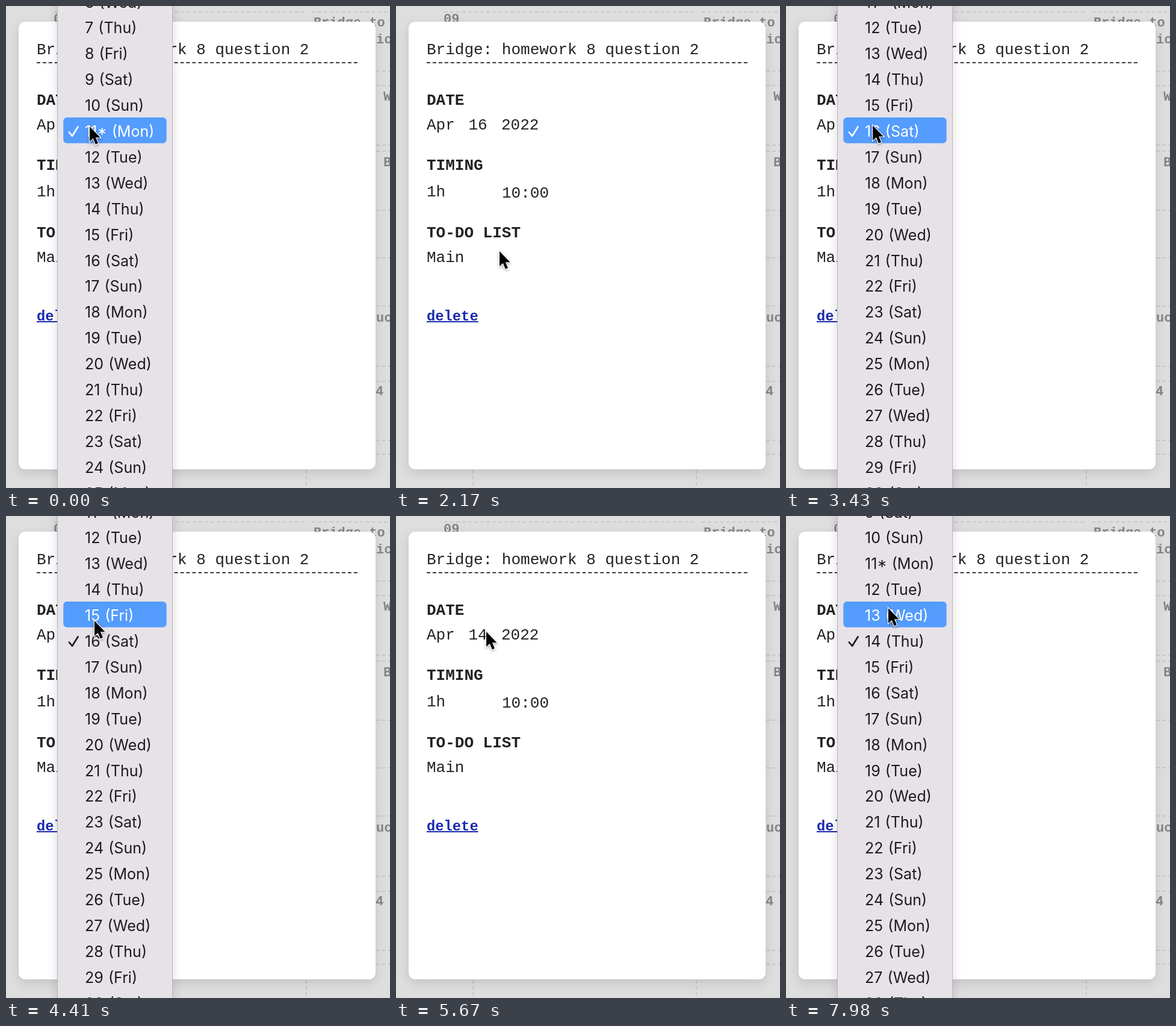
Recreate the animation shown at these times as an HTML page. Size 638x800 px, loop 8000 ms.

```html
<!DOCTYPE html>
<html lang="en">
<head>
<meta charset="utf-8">
<title>Task date picker</title>
<style>
  html, body { margin: 0; width: 100%; height: 100%; overflow: hidden; background: #dedede; }
  svg { display: block; }
  text { white-space: pre; }
  .mono { font: 26px "Courier New", "Liberation Mono", monospace; fill: #222; }
  .bold { font-weight: 700; }
  .back { font: 700 22px "Courier New", "Liberation Mono", monospace; fill: #858585; }
  .grid { stroke: #c9c9c9; stroke-width: 2; stroke-dasharray: 6 4; fill: none; }
  .item { font: 25.1px Inter, Roboto, sans-serif; word-spacing: 1px; }
  .link { font-size: 23.8px; fill: #1a2aad; }
  #card { filter: drop-shadow(0 6px 9px rgba(0, 0, 0, .12)); }
  #panel { filter: drop-shadow(0 3px 9px rgba(0, 0, 0, .16)); }
  #cursor { filter: drop-shadow(0 2px 2px rgba(0, 0, 0, .3)); }
</style>
</head>
<body>
<svg width="638" height="800" viewBox="0 0 638 800">
  <rect width="638" height="800" fill="#dedede"/>
  <g id="backdrop"></g>
  <rect id="card" x="21" y="26" width="593" height="743" rx="11" fill="#fff"/>
  <g id="form">
    <path d="M51 94.2H584" stroke="#222" stroke-width="1.8" stroke-dasharray="6 3.94"/>
    <path d="M51 524H136.5" stroke="#1a2aad" stroke-width="2"/>
  </g>
  <g id="menu">
    <rect id="panel" x="86" y="-20" width="190" height="840" fill="#e6e2e8"/>
    <path d="M85.5 0V800M276.5 0V800" stroke="#b9b6bb"/>
    <rect id="highlight" x="95.3" width="171.4" height="42.7" rx="6" fill="#549cfd"/>
    <path id="check" d="M104.8 209.5L110 215.7L119.5 200.5" fill="none" stroke-width="2.7" stroke-linecap="round" stroke-linejoin="round"/>
    <g id="items"></g>
  </g>
  <path id="cursor" d="M0 0V25L5.7 19.8L9.8 29.6L14 27.8L9.9 18.2H17.6Z" fill="#000" stroke="#fff" stroke-width="2.2" paint-order="stroke"/>
</svg>
<script>
const LOOP = 8000, STEP = 70, ROW = 42.9, CHECK_TOP = 185;
const FADE = 140, BLINK = 140;
const WEEK = ["Mon", "Tue", "Wed", "Thu", "Fri", "Sat", "Sun"];
const INK = "#1d1b1e";

const $ = id => document.getElementById(id);

function add(parent, tag, attrs, content = "") {
  const node = document.createElementNS("http://www.w3.org/2000/svg", tag);
  for (const key in attrs) node.setAttribute(key, attrs[key]);
  node.textContent = content;
  return parent.appendChild(node);
}

const label = (parent, cls, x, y, content) =>
  add(parent, "text", { class: cls, x, y }, content);

// Dimmed calendar behind the card
const backdrop = $("backdrop");
add(backdrop, "path", { class: "grid", d: "M128 770V800M499 770V800M80 10H500M508 10H638" });
for (const y of [108, 132, 231, 241, 339, 418, 498, 598, 623, 721, 744])
  add(backdrop, "path", { class: "grid", d: `M505 ${y}H638` });
label(backdrop, "back", 79, 28, "09");
label(backdrop, "back", 511, 34, "Bridge to");
label(backdrop, "back", 615, 62, "ic");
label(backdrop, "back", 627, 157, "W");
label(backdrop, "back", 627, 266, "B");
label(backdrop, "back", 615, 524, "uc");
label(backdrop, "back", 614, 646, "4");

// Task form
const form = $("form");
label(form, "mono", 51, 80, "Bridge: homework 8 question 2");
label(form, "mono bold", 51, 164, "DATE");
label(form, "mono", 51, 205, "Apr");
const dayText = label(form, "mono", 120.5, 205, "");
label(form, "mono", 175, 205, "2022");
label(form, "mono bold", 51, 272, "TIMING");
label(form, "mono", 51, 316, "1h");
label(form, "mono", 176, 318, "10:00");
label(form, "mono bold", 51, 384, "TO-DO LIST");
label(form, "mono", 51, 425, "Main");
label(form, "mono bold link", 51, 522, "delete");

// Day menu
const items = Array.from({ length: 30 }, (_, i) => {
  const day = i + 1, star = day === 11 ? "*" : "";
  return label($("items"), "item", 131, 0, `${day}${star} (${WEEK[(day + 3) % 7]})`);
});

const sessions = [
  { open: 0, close: 2030, checked: 11, picked: 16 },
  { open: 3290, close: 5180, checked: 16, picked: 14 },
  { open: 7350, close: Infinity, checked: 14 }
];

// Pointer stops: time, x, y
const stops = [
  [0, 139, 200], [250, 139, 200], [1120, 158, 417], [1700, 172, 407],
  [2800, 172, 407], [3220, 145, 197], [3700, 143, 200], [4410, 147, 174],
  [4760, 150, 130], [5250, 150, 130], [5600, 150, 192], [6110, 150, 192],
  [6650, 171, 256], [7000, 171, 256], [7290, 167, 202], [7560, 167, 204],
  [7980, 170, 153]
];

function pointer(t) {
  const next = stops.findIndex(s => s[0] > t);
  if (next < 0) return stops[stops.length - 1].slice(1);
  const [t0, x0, y0] = stops[next - 1], [t1, x1, y1] = stops[next];
  const p = (t - t0) / (t1 - t0), e = p * p * (3 - 2 * p);
  return [x0 + (x1 - x0) * e, y0 + (y1 - y0) * e];
}

function drawMenu(t, session, y) {
  const { close, checked, picked } = session;
  const hovered = checked + Math.floor((y - CHECK_TOP) / ROW);
  const active = t > close - BLINK - STEP ? picked : hovered;
  const blinking = t >= close - BLINK && t < close - BLINK + STEP;
  const lit = blinking ? 0 : active;

  $("menu").setAttribute("opacity", Math.max(0, Math.min(1, 1 - (t - close) / FADE)));
  $("highlight").setAttribute("y", CHECK_TOP + (active - checked) * ROW);
  $("highlight").setAttribute("visibility", lit ? "inherit" : "hidden");
  $("check").setAttribute("stroke", lit === checked ? "#fff" : INK);
  items.forEach((node, i) => {
    node.setAttribute("y", 217 + (i + 1 - checked) * ROW);
    node.setAttribute("fill", i + 1 === lit ? "#fff" : INK);
  });
}

function render(time) {
  const t = Math.floor(time % LOOP / STEP) * STEP;
  const [x, y] = pointer(t);
  const session = sessions.find(s => t >= s.open && t < s.close + FADE);

  dayText.textContent = t < 2030 ? 11 : t < 5180 ? 16 : 14;
  $("menu").setAttribute("visibility", session ? "visible" : "hidden");
  if (session) drawMenu(t, session, y);
  $("cursor").setAttribute("transform", `translate(${x} ${y})`);
}

const start = performance.now();
function tick() {
  render(performance.now() - start);
  requestAnimationFrame(tick);
}
tick();
</script>
</body>
</html>
```
